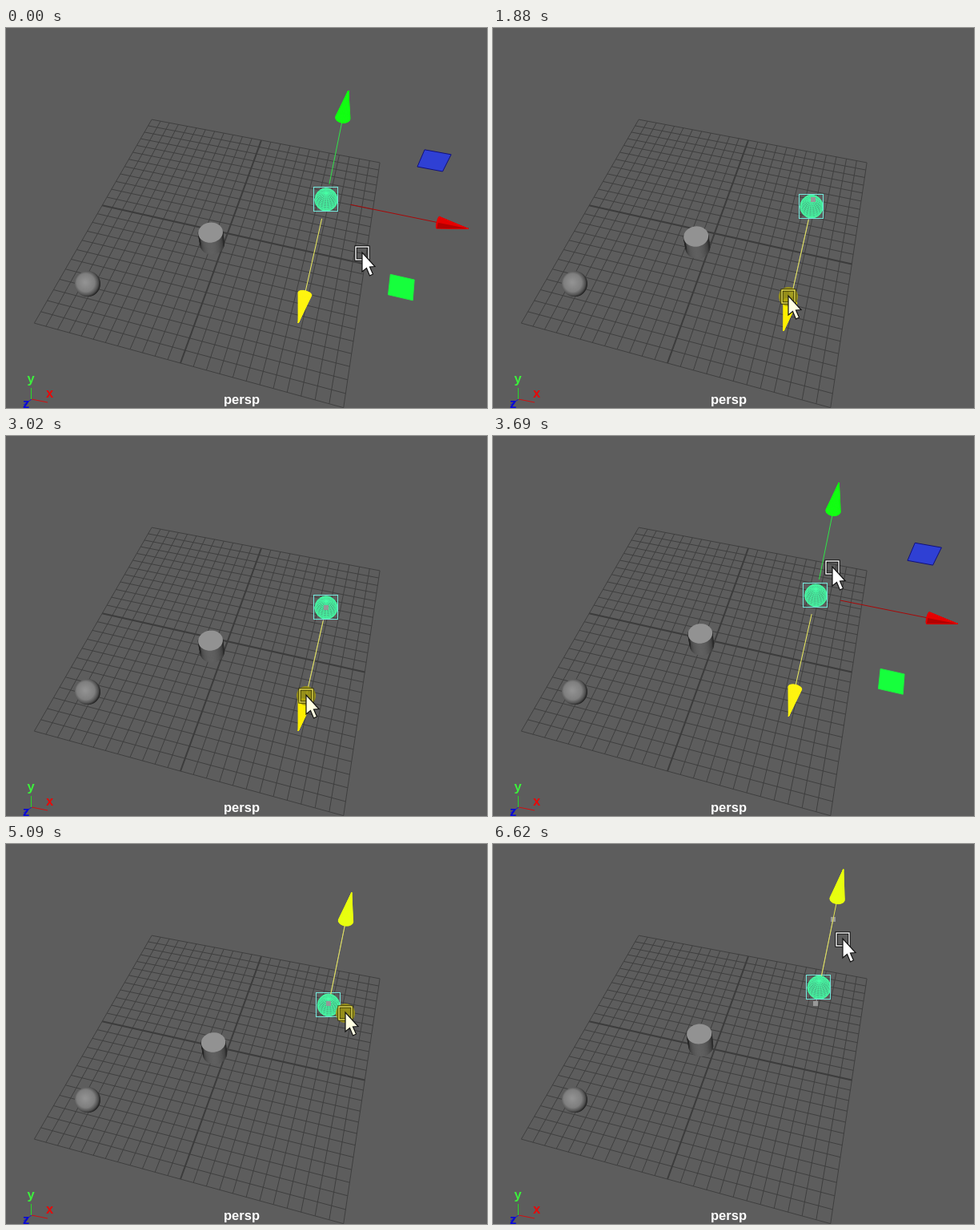
These frames come from a looping animation (601x474 px, 6.69 s). An HTML page with a canvas:

```html
<!DOCTYPE html>
<html lang="en">
<meta charset="utf-8">
<title>Viewport</title>
<style>
html, body { margin: 0; width: 601px; height: 474px; overflow: hidden; background: #5d5d5d }
canvas { display: block }
</style>
<canvas id="view" width="601" height="474"></canvas>
<script>
const g = document.getElementById('view').getContext('2d');
const LOOP = 6690, TAU = Math.PI * 2;
const Z_START = 850, Z_END = 3550, Y_START = 4370, RELEASE = 6580;
const Z_HOME = -6.02, Z_FINAL = -7.54, Y_TOP = 4.63;
const START = 2.15, BASE = 9.55, TIP = 12;
const BG = '#5d5d5d', WIRE = '#48ffa8';

// Turning points of the two drags: time, position along the axis
const Z_SWING = [[Z_START, Z_HOME], [1470, -.67], [2550, -14.9], [2990, -6], [3500, Z_FINAL]];
const Y_SWING = [[Y_START, 0], [4770, Y_TOP], [5170, -.75], [5930, Y_TOP], [6150, Y_TOP], [RELEASE, 2.3]];

const clamp = s => Math.min(1, Math.max(0, s));
const ease = s => (1 - Math.cos(Math.PI * clamp(s))) / 2;
const mix = (a, b, s) => a + (b - a) * s;
const mix2 = (p, q, s) => p.map((v, i) => mix(v, q[i], s));

// Each stroke eases from one turning point to the next
const swing = (keys, t) => keys.slice(1).reduce((value, [end, target], i) =>
  mix(value, target, ease((t - keys[i][0]) / (end - keys[i][0]))), keys[0][1]);

// The pointer follows the dragged handle
const zPointer = z => mix2([351, 366], [438, 214], (z + 2.81) / -11.52);
const yPointer = h => mix2([443, 80], [424, 211], Math.max(0, (Y_TOP - h) / 4.87) ** 1.64);
function pointer(t, z, h) {
  const pause = [424, 164];
  if (t < Z_START) return mix2([445, 281], zPointer(z), ease(t / 700));
  if (t < Z_END) return zPointer(z);
  if (t < 3690) return mix2(zPointer(z), pause, ease((t - Z_END) / 130));
  if (t < Y_START) return mix2(pause, yPointer(0), ease((t - 3900) / 450));
  return yPointer(h);
}

// Perspective camera
const depth = (x, y, z) => 1 - .0038 * x - .0201 * y - .01367 * z;
function project(x, y, z) {
  const w = depth(x, y, z);
  return [(276.8 + 12.59 * x - 6.28 * y - 7.88 * z) / w,
          (256.2 + 2.075 * x - 12.9 * y + 7.77 * z) / w];
}
// Rotates a unit normal into screen right, screen down, towards the viewer
function turn(x, y, z) {
  const near = .259 * x + .966 * z;
  return [.966 * x - .259 * z, .82 * near - .57 * y, .82 * y + .57 * near];
}

function line(points, color, width = 1) {
  g.beginPath();
  points.forEach(p => g.lineTo(...p));
  g.strokeStyle = color;
  g.lineWidth = width;
  g.stroke();
}
function poly(points, fill, edge, width = 1) {
  g.beginPath();
  points.forEach(p => g.lineTo(...p));
  g.closePath();
  g.fillStyle = fill;
  g.fill();
  if (edge) {
    g.strokeStyle = edge;
    g.lineWidth = width;
    g.stroke();
  }
}
function disc(x, y, r, fill) {
  g.beginPath();
  g.arc(x, y, r, 0, TAU);
  g.fillStyle = fill;
  g.fill();
}
function label(text, x, y, color) {
  g.font = 'bold 16.5px "Liberation Sans", Arial, sans-serif';
  g.textAlign = 'center';
  g.fillStyle = color;
  g.fillText(text, x, y);
}
const ring = (n, f) => Array.from({ length: n }, (_, i) => f(Math.cos(i / n * TAU), Math.sin(i / n * TAU)));

function drawGrid() {
  const pair = (i, color, width) => {
    line([project(i, 0, -12), project(i, 0, 12)], color, width);
    line([project(-12, 0, i), project(12, 0, i)], color, width);
  };
  for (let i = -12; i <= 12; i++) if (i) pair(i, '#3f3f3f', 1);
  pair(0, '#3c3c3c', 2);
}

function drawGreyBall() {
  const [x, y] = project(-9.58, 0, 7.78);
  const shade = g.createRadialGradient(x - 3, y - 2, 1, x - 2, y - 1, 18);
  shade.addColorStop(0, '#929292');
  shade.addColorStop(.6, '#7e7e7e');
  shade.addColorStop(.85, '#505050');
  shade.addColorStop(1, '#1c1c1c');
  disc(x, y, 16, shade);
}

function drawCylinder(x, y, z) {
  const R = 1.05, H = .96, n = 48;
  const rim = (a, h) => project(x + R * Math.cos(a), y + h, z + R * Math.sin(a));
  for (let i = 0; i < n; i++) {
    const a = i / n * TAU, b = (i + 1) / n * TAU, m = (a + b) / 2;
    const light = turn(Math.cos(m), 0, Math.sin(m))[2];
    if (light < -.04) continue;
    const v = Math.round(36 + 105 * Math.max(light, 0));
    const color = `rgb(${v},${v},${v})`;
    poly([rim(a, H), rim(b, H), rim(b, -H), rim(a, -H)], color, color, .6);
  }
  poly(ring(n, (c, s) => project(x + R * c, y + H, z + R * s)), '#929292');
}

function drawWireBall([x, y], r) {
  const N = 20;
  disc(x, y, r, '#46ad80');
  const at = (i, j) => {
    const lat = i / N * Math.PI, lon = j / N * TAU;
    return turn(Math.sin(lat) * Math.cos(lon), Math.cos(lat), Math.sin(lat) * Math.sin(lon));
  };
  const edge = (p, q) => {
    if (p[2] < 0 || q[2] < 0) return;
    g.moveTo(x + r * p[0], y + r * p[1]);
    g.lineTo(x + r * q[0], y + r * q[1]);
  };
  g.beginPath();
  for (let i = 0; i < N; i++) for (let j = 0; j < N; j++) {
    edge(at(i, j), at(i + 1, j));
    edge(at(i, j), at(i, j + 1));
  }
  g.strokeStyle = WIRE;
  g.lineWidth = .8;
  g.stroke();
  g.strokeStyle = '#74e8dc';
  g.lineWidth = 1;
  g.strokeRect(Math.round(x) - 15.5, Math.round(y) - 15.5, 30, 30);
}

// Handle space: constant size on screen, centred on the ball
function handleSpace(x, y, z) {
  const w = depth(x, y, z);
  return v => project(x + v[0] * w, y + v[1] * w, z + v[2] * w);
}
const along = (axis, k) => [0, 1, 2].map(i => i == axis ? k : 0);

function drawArrow(at, axis, color, lineColor, start = START) {
  const R = .52, n = 24;
  line([at(along(axis, start)), at(along(axis, BASE))], lineColor);
  const tip = at(along(axis, TIP));
  const base = ring(n, (c, s) => {
    const v = along(axis, BASE);
    v[(axis + 1) % 3] = R * c;
    v[(axis + 2) % 3] = R * s;
    return at(v);
  });
  poly(base, color);
  base.forEach((p, i) => poly([tip, p, base[(i + 1) % n]], color, color, .4));
  if (axis == 0) {
    const low = base.reduce((a, b) => b[1] > a[1] ? b : a);
    poly([tip, at(along(0, BASE)), low], '#b40000');
  }
}

function drawPlane(at, axis, fill, edge) {
  const mid = 7.05, half = .92;
  poly([[-1, -1], [1, -1], [1, 1], [-1, 1]].map(([a, b]) => {
    const v = along(axis, mid + b * half);
    v[0] = mid + a * half;
    return at(v);
  }), fill, edge);
}

function drawCursor(x, y, pressed) {
  x = Math.round(x);
  y = Math.round(y);
  const frame = (color, width) => {
    g.strokeStyle = color;
    g.lineWidth = width;
    g.strokeRect(x - 8, y - 8, 16, 16);
  };
  if (pressed) disc(x, y, 12, 'rgba(160,152,14,.85)');
  frame(pressed ? '#2c2a00' : '#000', 3.2);
  frame(pressed ? '#f2ea58' : '#fff', 1.4);
  const arrow = [[0, 0], [0, 24], [5.5, 19.5], [9.5, 29], [13.5, 27], [9.5, 18], [16, 17.5]];
  poly(arrow.map(p => [x + p[0], y - 1 + p[1]]), pressed ? '#ffffe2' : '#fff', '#111', 1.2);
}

function drawAxes() {
  line([[32, 463], [22, 470]], '#1414d8');
  line([[32, 463], [52, 467]], '#d01010');
  line([[31.5, 449], [31.5, 463]], '#28d828');
  label('y', 31, 442.5, '#3cf03c');
  label('x', 54.5, 461, '#e80808');
  label('z', 25, 474, '#0808d8');
}

function draw(t) {
  const z = swing(Z_SWING, t), h = swing(Y_SWING, t);
  const zDrag = t >= Z_START && t < Z_END, yDrag = t >= Y_START, dragging = zDrag || yDrag;
  const ball = [7.7, h, z], at = handleSpace(...ball);
  const axis = zDrag ? 2 : 1;
  const rest = handleSpace(7.7, 0, zDrag ? Z_HOME : Z_FINAL);
  const ghost = [rest([0, 0, 0]), rest(along(axis, BASE))];

  g.fillStyle = BG;
  g.fillRect(0, 0, 601, 474);
  drawGrid();
  drawGreyBall();
  drawCylinder(-1.2, h / 2, (7.78 + z) / 2);
  if (dragging) line(ghost, '#a0a0a0');
  drawWireBall(project(...ball), 15 / depth(...ball));

  if (dragging) {
    g.fillStyle = '#989898';
    ghost.forEach(([x, y]) => g.fillRect(Math.round(x) - 3, Math.round(y) - 3, 6, 6));
    drawArrow(at, axis, axis == 1 ? '#e8ff10' : '#fff000', '#e4e454', 1.5);
  } else {
    drawPlane(at, 1, '#2f40d4', '#10107c');
    drawPlane(at, 2, '#16ff3c', '#20e840');
    drawArrow(at, 0, '#e60000', '#a80808');
    drawArrow(at, 1, '#12ff12', '#30e448');
    drawArrow(at, 2, '#fff410', '#f0f060');
  }

  drawAxes();
  label('persp', 294.5, 468.5, '#fff');
  drawCursor(...pointer(t, z, h), dragging && t < RELEASE);
}

const begin = performance.now();
function tick() {
  draw((performance.now() - begin) % LOOP);
  requestAnimationFrame(tick);
}
tick();
</script>
</html>
```
